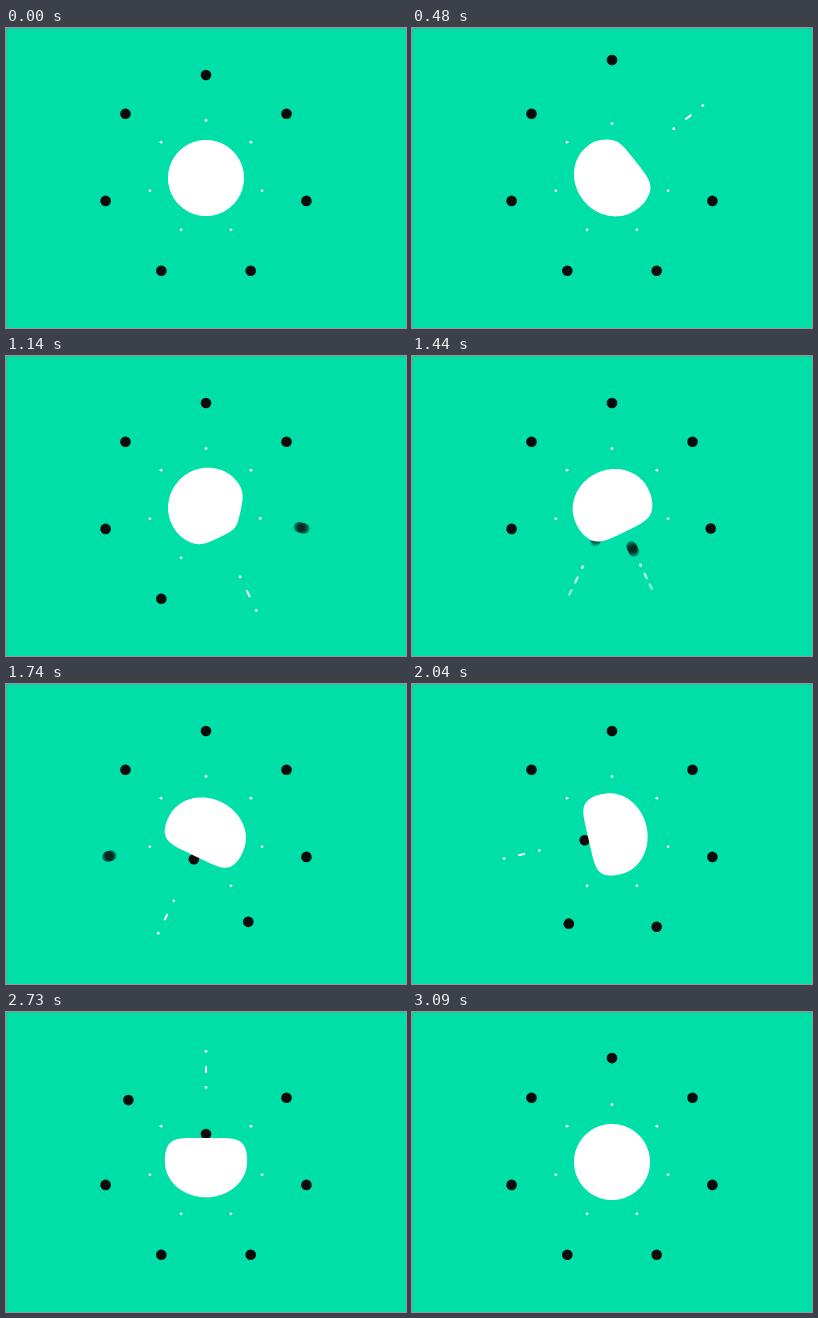
Animation of 400x300 px, one loop 3120 ms. Source, as an HTML page with a canvas:

```html
<!DOCTYPE html>
<html lang="en">
<head>
<meta charset="utf-8">
<title>Bouncing ring</title>
<style>
  html, body { margin: 0; width: 100%; height: 100%; overflow: hidden; background: #00dfa8; }
  canvas { display: block; width: 400px; height: 300px; }
</style>
</head>
<body>
<canvas id="stage" width="400" height="300"></canvas>
<script>
const ctx = document.getElementById('stage').getContext('2d');
const LOOP = 3120, STEP = 30, BEAT = 344, COUNT = 7;
const BALL = 38, RING = 103, SPARK = 57.5, DOT = 5.3;
const TAU = Math.PI * 2;

// Eased step from 0 to 1 between times a and b.
function ramp(t, a, b) {
  const s = Math.min(1, Math.max(0, (t - a) / (b - a)));
  return (1 - Math.cos(Math.PI * s)) / 2;
}

// All motions below take p, the ms since a dot's own beat.

// Dive into the ball, get pushed back a little, shoot past the ring, settle.
function dotRadius(p, kick, dip) {
  const dive = 85, push = 10;
  return RING - dive * ramp(p, 10, 86) + push * ramp(p, 150, 310)
    + (dive - push + kick) * ramp(p, 372, 490)
    - (kick + dip) * ramp(p, 490, 706) + dip * ramp(p, 706, 780);
}

// Fly out, relax, snap back past rest, settle.
function sparkReach(p) {
  const out = 1.05, relax = 0.22, under = 0.15;
  return out * ramp(p, 15, 115) - relax * ramp(p, 200, 320)
    - (out - relax + under) * ramp(p, 355, 470) + under * ramp(p, 490, 620);
}

function dent(p) {
  return ramp(p, 70, 180) - ramp(p, 340, 510);
}

function direction(i) {
  const a = -Math.PI / 2 + i * TAU / COUNT;
  return [Math.cos(a), Math.sin(a)];
}

function disc(x, y, r) {
  ctx.beginPath();
  ctx.arc(x, y, r, 0, TAU);
  ctx.fill();
}

// Paints a moving value with a short shutter blur; slow values stay crisp.
function smear(value, p, limit, paint) {
  const shutter = 3, copies = 7;
  if (Math.abs(value(p + shutter) - value(p - shutter)) < limit) {
    paint(value(p));
    return;
  }
  ctx.globalAlpha = 0.25;
  for (let i = 0; i < copies; i++) {
    paint(value(p + shutter * (2 * i / (copies - 1) - 1)));
  }
  ctx.globalAlpha = 1;
}

function drawDot([cx, cy], r) {
  ctx.fillStyle = '#0a0c0b';
  disc(cx * r, cy * r, DOT);
}

function drawSpark([cx, cy], q) {
  const near = SPARK + 20.5 * q;
  ctx.fillStyle = ctx.strokeStyle = '#fff';
  disc(cx * near, cy * near, 1.4);
  if (q < 0.1) return;
  const e = Math.min(q, 1), gap = 18.6 * (1 - (1 - e) ** 2);
  const mid = near + gap, far = mid + gap, half = 3.8 * Math.sqrt(e);
  ctx.lineWidth = 2;
  ctx.beginPath();
  ctx.moveTo(cx * (mid - half), cy * (mid - half));
  ctx.lineTo(cx * (mid + half), cy * (mid + half));
  ctx.stroke();
  disc(cx * far, cy * far, 1.4);
}

function softMin(a, b, k) {
  const h = Math.max(k - Math.abs(a - b), 0) / k;
  return Math.min(a, b) - h * h * k / 4;
}

// Flattens the side facing the hit and widens the ball across it.
function press(x, y, [cx, cy], a) {
  let u = x * cx + y * cy, v = y * cx - x * cy;
  v *= 1 + a * (0.08 + 0.08 * Math.max(0, u / BALL));
  u = u < 0 ? u * (1 - 0.07 * a) : softMin(u, BALL - 14 * a, 12 * Math.sqrt(a));
  return [u * cx - v * cy, u * cy + v * cx];
}

function drawBall(hits) {
  ctx.fillStyle = '#fff';
  ctx.beginPath();
  for (let i = 0; i < 180; i++) {
    const a = i * TAU / 180;
    let x = BALL * Math.cos(a), y = BALL * Math.sin(a);
    for (const h of hits) [x, y] = press(x, y, h.dir, h.amount);
    ctx.lineTo(x, y);
  }
  ctx.fill();
}

function draw(t) {
  ctx.setTransform(1, 0, 0, 1, 0, 0);
  ctx.fillStyle = '#00dfa8';
  ctx.fillRect(0, 0, 400, 300);
  ctx.fillStyle = 'rgba(100, 150, 135, 0.5)';
  ctx.fillRect(0, 0, 400, 1);
  ctx.fillRect(0, 1, 1, 299);
  ctx.translate(200, 150);

  const hits = [];
  for (let i = 0; i < COUNT; i++) {
    // The top dot strikes a second time to close the loop, with a bigger kick.
    const last = i === 0 && t >= COUNT * BEAT;
    const p = t - (last ? COUNT : i) * BEAT;
    const dir = direction(i), amount = dent(p);
    const radius = last ? s => dotRadius(s, 30.6, 0) : s => dotRadius(s, 16.6, 5.5);
    smear(radius, p, 2.5, r => drawDot(dir, r));
    smear(sparkReach, p, 0.05, q => drawSpark(dir, q));
    if (amount > 0.001) hits.push({ dir, amount });
  }
  drawBall(hits);
}

const start = performance.now();
function tick() {
  const t = (performance.now() - start) % LOOP;
  draw(Math.floor(t / STEP) * STEP);
  requestAnimationFrame(tick);
}
tick();
</script>
</body>
</html>
```
